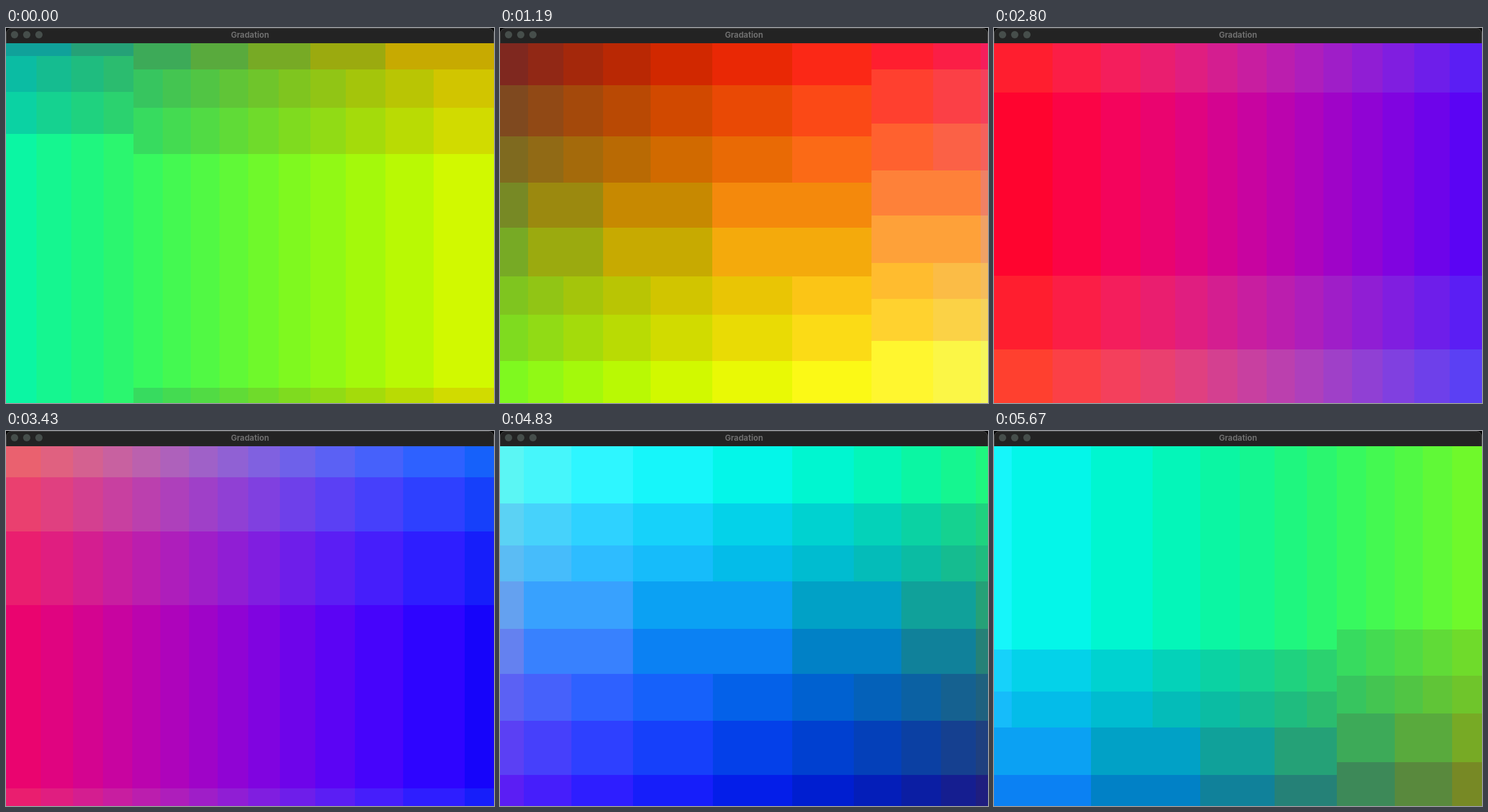
Animation, 800 px wide and 616 px high, one loop 5.74 s. Source, as an HTML page with a canvas:

```html
<!DOCTYPE html>
<html lang="en">
<head>
<meta charset="utf-8">
<title>Gradation</title>
<style>
  html, body { margin: 0; width: 100%; height: 100%; overflow: hidden; background: #232323; }
  .window { position: relative; width: 800px; height: 616px; overflow: hidden; background: #000; }
  .bar {
    position: absolute; inset: 0 0 auto; height: 25px; box-sizing: border-box;
    background: #232323; border: solid #454545; border-width: 1px 1px 0;
    border-radius: 9px 9px 0 0;
    font: 700 13px/20px Inter, sans-serif; text-align: center; color: #6e6e6e;
  }
  .bar i { position: absolute; top: 4px; width: 12px; height: 12px; border-radius: 50%; background: #464e4b; }
  canvas { position: absolute; left: 0; top: 25px; }
</style>
</head>
<body>
<div class="window">
  <div class="bar"><i style="left:7px"></i><i style="left:27px"></i><i style="left:47px"></i>Gradation</div>
  <canvas width="800" height="591"></canvas>
</div>
<script>
const canvas = document.querySelector('canvas');
const ctx = canvas.getContext('2d');
const { width, height } = canvas;

// Red and blue are cosines along x, green is a cosine along y.
// The three are 2 radians apart, and a radian is SX or SY pixels.
const SX = 400, SY = 300, TURN = 2 * Math.PI;
const STEP = 70, LOOP = 5740, START = -1.757, RATE = 1 / 15;
const COLS = 36;

// Bands are narrow where the colour changes fast: solves s = x + sin(2x + shift) / 4
function unwarp(s, shift) {
  let x = s;
  for (let i = 0; i < 40; i++) x = s - Math.sin(2 * x + shift) / 4;
  return x;
}
const colEdge = j => unwarp((j + 0.55) * TURN / COLS, 4);
const rowEdge = s => unwarp(s, Math.PI);
const wave = a => Math.round(127.5 + 127.5 * Math.cos(a));

// Columns from..to, rows counted from the weakest green up to its peak
function addRegion(cells, from, to, top) {
  let high = Math.PI;
  for (let low = top; high > 0;) {
    const mid = (low + high) / 2;
    const span = Math.abs(mid - 1.35) < 0.3 ? 2 : 1;
    const g0 = rowEdge(low), g1 = rowEdge(high), green = (g0 + g1) / 2;
    for (let j = from; j < to; j += span) {
      const h0 = colEdge(j), h1 = colEdge(j + span), hue = (h0 + h1) / 2;
      cells.push({
        x0: h0 * SX, x1: h1 * SX, y0: g0 * SY, y1: g1 * SY,
        color: `rgb(${wave(hue)},${wave(green)},${wave(hue + 4)})`
      });
    }
    high = low;
    low -= low > 1.1 ? 0.37 : 0.25;
    if (low < 0.25) low = 0;
  }
}

const cells = [];
addRegion(cells, -2, 22, 2.85);  // red through blue to green
addRegion(cells, 22, 34, 2.75);  // green through yellow to red

function box(...edges) {
  const [x0, x1, y0, y1] = edges.map(Math.round);
  if (x1 > 0 && x0 < width && y1 > 0 && y0 < height) ctx.fillRect(x0, y0, x1 - x0, y1 - y0);
}

function draw(phase) {
  const left = SX * (1 - phase);
  const peak = SY * (phase + 3) + 1;
  for (const { x0, x1, y0, y1, color } of cells) {
    ctx.fillStyle = color;
    for (const x of [left, left - TURN * SX]) {
      for (const y of [peak, peak - TURN * SY]) {
        box(x + x0, x + x1, y - y1, y - y0);
        box(x + x0, x + x1, y + y0, y + y1);
      }
    }
  }
}

let shown = -1;
function tick() {
  const step = Math.floor(performance.now() % LOOP / STEP);
  if (step !== shown) {
    shown = step;
    draw(START + step * RATE);
  }
  requestAnimationFrame(tick);
}
tick();
</script>
</body>
</html>
```
